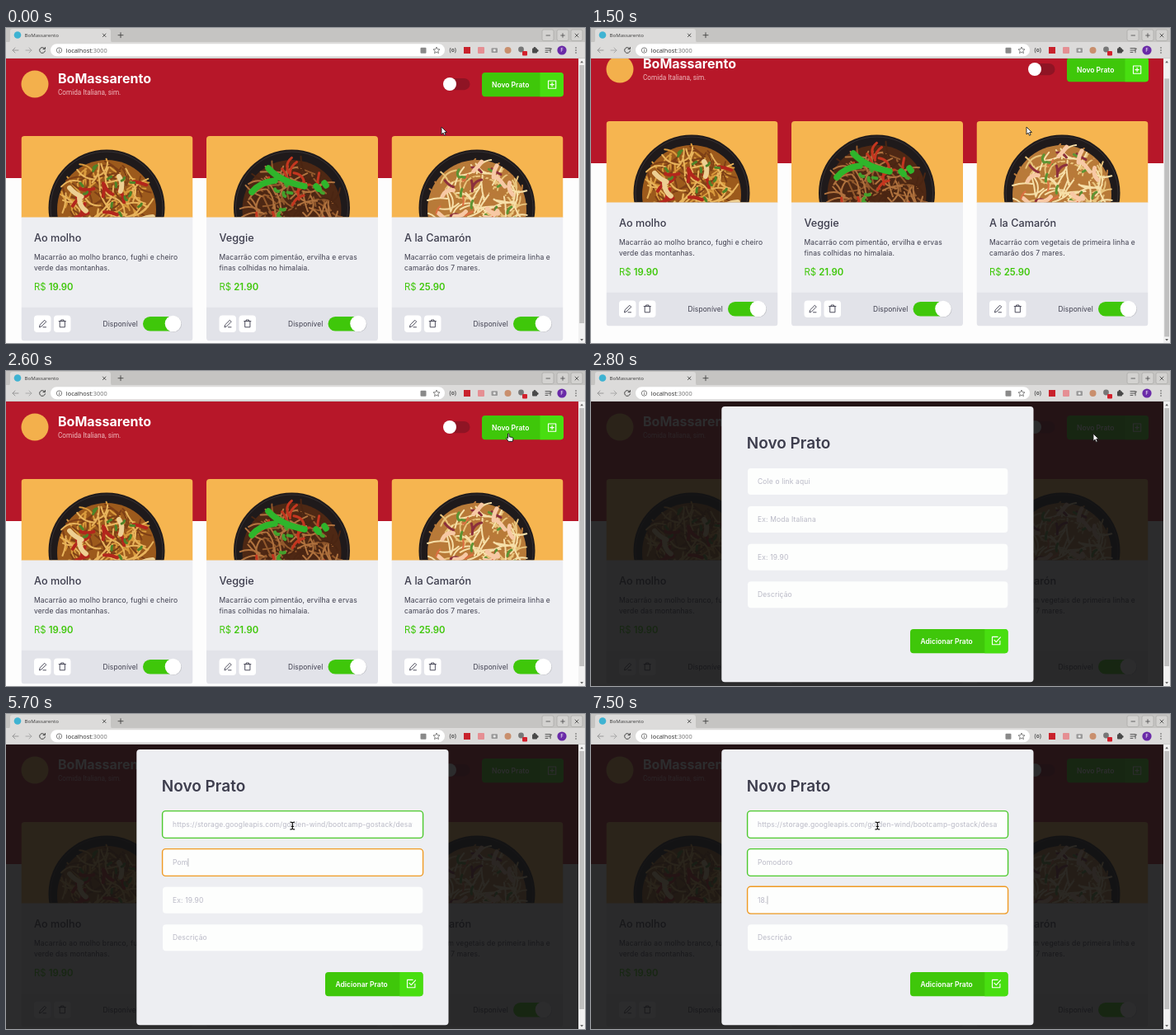
An HTML page for the animation above (8 s loop, 702 px wide and 382 px high).

```html
<!DOCTYPE html>
<html lang="pt-BR">
<head>
<meta charset="utf-8">
<title>BoMassarento</title>
<style>
  html, body { margin: 0; width: 100%; height: 100%; overflow: hidden; background: #fdfdfd; }
  svg { display: block; width: 702px; height: 382px; }
  text { font-family: Inter, "Open Sans", sans-serif; white-space: pre; }
  .ui { font-family: "Noto Sans", sans-serif; }
  .body { letter-spacing: .14px; }
  .line { fill: none; stroke-linecap: round; stroke-linejoin: round; }
</style>
</head>
<body>
<svg id="stage" viewBox="0 0 702 382" xmlns="http://www.w3.org/2000/svg"></svg>
<script>
const LOOP = 8000, MAX_SCROLL = 18, MODAL_AT = 2800;
const GREEN = '#3fc70a', LIME = '#48de10', INK = '#3d3d4d', HINT = '#b9b9c6', CHROME = '#dcdbda';
const stage = document.getElementById('stage');

const rect = (x, y, w, h, fill, r = 0, more = '') =>
  `<rect x="${x}" y="${y}" width="${w}" height="${h}" rx="${r}" fill="${fill}" ${more}/>`;
const disc = (x, y, r, fill, more = '') =>
  `<circle cx="${x}" cy="${y}" r="${r}" fill="${fill}" ${more}/>`;
const line = (d, color, w = 1, more = '') =>
  `<path class="line" d="${d}" stroke="${color}" stroke-width="${w}" ${more}/>`;
const text = (x, y, str, size, fill, weight = 400, more = '') =>
  `<text x="${x}" y="${y}" font-size="${size}" fill="${fill}" font-weight="${weight}" ${more}>${str}</text>`;

function seeded(seed) {
  return () => (seed = (seed * 16807) % 2147483647) / 2147483647;
}

// Dish picture: dark plate, tangled strands and some garnish
function photo(cx, look, seed) {
  const rnd = seeded(seed), cy = 218;
  const spot = reach => {
    const a = rnd() * Math.PI * 2, r = Math.sqrt(rnd()) * reach;
    return [cx + r * Math.cos(a), cy + r * Math.sin(a)];
  };
  const strands = (n, len, reach) => {
    let d = '';
    for (let i = 0; i < n; i++) {
      const [x, y] = spot(reach), a = rnd() * 6.3, bend = (rnd() - .5) * len * 1.6;
      const dx = Math.cos(a) * len / 2, dy = Math.sin(a) * len / 2;
      d += `M${(x - dx).toFixed(1)} ${(y - dy).toFixed(1)}q${(dx - dy / len * bend).toFixed(1)} ` +
        `${(dy + dx / len * bend).toFixed(1)} ${(2 * dx).toFixed(1)} ${(2 * dy).toFixed(1)}`;
    }
    return d;
  };
  return disc(cx, cy, 70.5, '#1f1a1b') + disc(cx, cy, 68, 'none', 'stroke="#353032" stroke-width="1"') +
    disc(cx, cy + 2, 60, look.base) +
    look.noodles.map(c => line(strands(46, 24, 54), c, 2)).join('') +
    look.garnish.map(([c, n, len, w]) => line(strands(n, len, 52), c, w)).join('');
}

const dishes = [
  { x: 18.5, name: 'Ao molho', price: '19.90',
    info: ['Macarrão ao molho branco, fughi e cheiro', 'verde das montanhas.'],
    look: { base: '#9c5a1c', noodles: ['#d99a3c', '#7d3f16', '#e8b45c'],
      garnish: [['#b3261c', 13, 16, 4], ['#edcf92', 11, 18, 6], ['#4f8428', 18, 5, 3]] } },
  { x: 243, name: 'Veggie', price: '21.90',
    info: ['Macarrão com pimentão, ervilha e ervas', 'finas colhidas no himalaia.'],
    look: { base: '#4e2814', noodles: ['#93592c', '#4a2512', '#b0723e'],
      garnish: [['#c4361f', 18, 18, 3], ['#43a02c', 9, 5, 4]] },
    extra: 'M318 170q14 16 44 22M298 199q10-12 28-14M376 192l3 3M386 188l2 3' },
  { x: 467.5, name: 'A la Camarón', price: '25.90',
    info: ['Macarrão com vegetais de primeira linha e', 'camarão dos 7 mares.'],
    look: { base: '#b87a38', noodles: ['#e9c47c', '#b9793a', '#f6dfa8'],
      garnish: [['#8c2f3c', 9, 13, 3], ['#5d9433', 12, 9, 3], ['#f7c8a4', 14, 15, 5], ['#dd6f42', 9, 10, 2]] } }
];

function card({ x, name, price, info, look, extra }, i) {
  const tx = x + 15.5;
  return `<g clip-path="url(#card${i})">` +
    rect(x, 131, 208, 99, '#f6b550') +
    `<g clip-path="url(#pic${i})">` + photo(x + 103.5, look, 71 + i * 913) +
    (extra ? line(extra, '#2fb52b', 7.5) : '') + '</g>' +
    rect(x, 229.5, 208, 109, '#edeef2') + rect(x, 338.5, 208, 41, '#e2e3e9') + '</g>' +
    text(tx, 258.5, name, 12.7, INK, 500) +
    info.map((s, k) => text(tx, 281 + k * 12.6, s, 8.5, INK, 400, 'class="body"')).join('') +
    text(tx, 318, `R$ <tspan font-weight="600">${price}</tspan>`, 11.3, GREEN) +
    rect(tx, 348.5, 20.5, 20.5, '#fff', 4) + rect(tx + 24, 348.5, 20.5, 20.5, '#fff', 4) +
    line(`M${tx + 6.5} 362.5l.7-2.6 5.6-5.6 1.9 1.9-5.6 5.6zM${tx + 11} 362.8h3.5`, INK, .9) +
    line(`M${tx + 30.2} 355.6h8.2M${tx + 32.6} 355.4v-1.4h3.4v1.4M${tx + 31.2} 355.8v7h6.2v-7`, INK, .9) +
    text(x + 99, 361.6, 'Disponível', 8.4, INK, 400, 'class="body"') +
    rect(x + 147.5, 350, 44.5, 17.5, GREEN, 8.75) +
    disc(x + 184.5, 359, 10, '#0002') + disc(x + 184, 358.5, 9.8, '#fff');
}

function button(x, y, w, split, label, lx, icon) {
  return rect(x, y, w, 29.2, GREEN, 4) +
    `<path d="M${split} ${y}H${x + w - 4}q4 0 4 4v21.2q0 4-4 4H${split}z" fill="${LIME}"/>` +
    text(lx, y + 17.5, label, 8.5, '#fff', 600) + line(icon, '#fff', 1.1);
}

const clips = dishes.map(({ x }, i) =>
  `<clipPath id="card${i}">${rect(x, 131, 208, 248.5, '#000', 4)}</clipPath>` +
  `<clipPath id="pic${i}">${rect(x, 131, 208, 98.5, '#000')}</clipPath>`).join('');

const page = rect(0, 0, 694, 182, '#b71729') +
  disc(35, 68, 16.5, '#f3b04c') +
  text(63, 67, 'BoMassarento', 16, '#fff', 700) +
  text(63, 81, 'Comida Italiana, sim.', 8.2, '#eeb9bd', 400, 'style="font-family:Roboto,sans-serif"') +
  rect(532, 61, 30.5, 14.2, '#8f1424', 7.1) + disc(538, 68, 8, '#fff') +
  button(577, 54, 99, 647.5, 'Novo Prato', 589,
    'M657.5 64h9.2v9.2h-9.2zM662.1 66.4v4.4M659.9 68.6h4.4') +
  dishes.map(card).join('');

const URL_TEXT = 'https://storage.googleapis.com/golden-wind/bootcamp-gostack/desafio-food/food1.png';
const fields = [
  { y: 117, hint: 'Cole o link aqui', value: URL_TEXT, keys: [4100], from: 3900, to: 4600 },
  { y: 163, hint: 'Ex: Moda Italiana', value: 'Pomodoro',
    keys: [5200, 5400, 5700, 5800, 5900, 6100, 6200, 6300], from: 4600, to: 6500 },
  { y: 208.7, hint: 'Ex: 19.90', value: '18.', keys: [7100, 7200, 7500], from: 6500, to: LOOP },
  { y: 254.3, hint: 'Descrição', value: '', keys: [], from: LOOP, to: LOOP }
];

const modal = rect(0, 37, 694, 345, '#121214', 0, 'opacity=".89"') +
  rect(158.3, 43, 378.2, 334.3, '#edeef2', 4) +
  text(188.8, 93.8, 'Novo Prato', 19, INK, 600) +
  fields.map((f, i) => rect(190, f.y + 1, 315.3, 32, '#fdfefd', 4) +
    rect(189.6, f.y + .6, 316, 32.8, 'none', 4, `id="edge${i}" stroke-width="1.4"`) +
    `<g clip-path="url(#inner)">` + text(202, f.y + 20, '', 8.5, HINT, 400, `id="val${i}" class="body"`) + '</g>' +
    rect(0, f.y + 12, .7, 10, '#9a9aa4', 0, `id="caret${i}"`)).join('') +
  `<g clip-path="url(#inner)"><path id="spell" class="line" stroke="#f08a94" stroke-width=".9"/></g>` +
  button(387, 313, 118.6, 477.3, 'Adicionar Prato', 399.5,
    'M495.9 327.2v4.6h-9.4v-9.4h6.6M489 326.4l2.3 2.3 5.2-5.8');

const windowButton = (x, d) => rect(x, 2, 14, 13.5, '#d3d2d0', 2, 'stroke="#aaa9a7" stroke-width=".7"') +
  line(d, '#555', .9);

const browser = rect(0, 0, 702, 18, '#c5c4c2') +
  `<path d="M2 18q3 0 3-4V4q0-3 3-3h116q3 0 3 3v10q0 4 3 4z" fill="${CHROME}"/>` +
  rect(0, 17, 702, 20, CHROME) + rect(0, 36.3, 702, .7, '#c6c6c5') +
  disc(14, 8.5, 4.3, '#3fb3d2') +
  text(22.5, 11, 'BoMassarento', 6.1, '#444', 400, 'class="ui"') +
  line('M117.4 7l3.6 3.6M121 7l-3.6 3.6M136 8.7h6M139 5.7v6', '#444', .9) +
  windowButton(650, 'M655 9h4.5') + windowButton(668, 'M672.7 9h4.6M675 6.7v4.6') +
  windowButton(685, 'M690 7l4 4M694 7l-4 4') +
  line('M15 27H8M11 24l-3 3 3 3', '#999', 1) + line('M24 27h7M28 24l3 3-3 3', '#aaa', 1) +
  line('M47 25.2a3.4 3.4 0 1 0 .4 2.6M47.4 23.4v2.2h-2.3', '#444', 1) +
  rect(54, 19.3, 478, 15, '#fff', 7.5) +
  disc(64.5, 27, 3.2, 'none', 'stroke="#666" stroke-width=".8"') + line('M64.5 26.8v1.8M64.5 25.2v.1', '#666', .8) +
  text(72.8, 29.6, 'localhost<tspan fill="#777">:3000</tspan>', 7.35, '#333', 400, 'class="ui"') +
  rect(502.5, 23.7, 7, 7, '#8a8a8a', 1) +
  '<path d="M522 23l1.1 2.7 2.9.2-2.2 1.9.7 2.8-2.5-1.5-2.5 1.5.7-2.8-2.2-1.9 2.9-.2z" fill="none" stroke="#666" stroke-width=".8"/>' +
  text(537.5, 29.4, '(o)', 6.5, '#555', 700, 'class="ui"') +
  rect(555, 23, 8, 8, '#c9222c') + rect(572, 23, 8, 8, '#e58f93', 1) +
  rect(588.5, 24.3, 7.5, 5.7, '#999', 1) + disc(592.2, 27, 1.6, '#e6e6e6') +
  disc(608.5, 27, 4, '#c98f6d') + disc(624.5, 26, 3.4, '#777') + rect(626, 28, 6, 5.5, '#d3202c', 1) +
  rect(638, 24.5, 6, 6, '#4a4a4a', 1) + disc(641, 24.3, 1.4, '#4a4a4a') + disc(644.2, 27.5, 1.4, '#4a4a4a') +
  line('M654 24.6h6M654 27h6M654 29.4h3M660 29.8v-4.6h1.5', '#555', 1) +
  disc(674, 27, 5.6, '#6a2aa8') + text(672.2, 29.3, 'F', 6.3, '#fff', 400, 'class="ui"') +
  [24, 27, 30].map(y => disc(691, y, .8, '#555')).join('');

const scrollbar = rect(694, 37, 8, 345, '#f1f1f1') +
  '<path d="M696.2 42.2h3.8l-1.9-2.4zM696.2 377h3.8l-1.9 2.4z" fill="#666"/>' +
  rect(695.2, 45, 5.8, 313, '#c0c0c0', 0, 'id="thumb"');

const beam = 'M-2.4-4.4Q0-4.4 0-3.2V3.2Q0 4.4-2.4 4.4M2.4-4.4Q0-4.4 0-3.2M0 3.2Q0 4.4 2.4 4.4M-1.2.8h2.4';
const pointers = `
  <g id="arrow"><path d="M0 0v9l2.1-1.9 1.4 3.2 1.6-.7L3.7 6.5h2.8z" fill="#fff" stroke="#222" stroke-width=".9"/></g>
  <g id="hand"><path d="M-.5 0q1.2-.6 1.6.6v3.2l4 .7q1 .3.8 1.5l-.6 3.4H.2L-2.2 6q-.6-1.2.7-1.2l1 .9z" fill="#fff" stroke="#111" stroke-width=".9"/></g>
  <g id="beam">${line(beam, '#fff', 2.2)}${line(beam, '#111', 1.2)}</g>`;

stage.innerHTML = `<defs>${clips}
    <clipPath id="view">${rect(0, 37, 694, 345, '#000')}</clipPath>
    <clipPath id="inner">${rect(202, 110, 290.5, 180, '#000')}</clipPath></defs>` +
  rect(0, 0, 702, 382, '#fdfdfd') +
  `<g clip-path="url(#view)"><g id="page">${page}</g></g><g id="modal">${modal}</g>` +
  scrollbar + browser + pointers;

const $ = id => document.getElementById(id);
const show = (el, on) => el.setAttribute('visibility', on ? 'visible' : 'hidden');
const move = (el, x, y) => el.setAttribute('transform', `translate(${x} ${y})`);

// Piecewise motion through [time, value...] stops, eased between each pair
function follow(stops, t) {
  const i = stops.findIndex(s => s[0] > t);
  if (i < 0) return stops[stops.length - 1].slice(1);
  if (i === 0) return stops[0].slice(1);
  const a = stops[i - 1], b = stops[i];
  const p = (t - a[0]) / (b[0] - a[0]), e = p * p * (3 - 2 * p);
  return a.slice(1).map((v, k) => v + (b[k + 1] - v) * e);
}

const scrollStops = [[0, 0], [400, MAX_SCROLL], [900, 0], [1100, 0], [1500, MAX_SCROLL], [2000, 0]];
const mouseStops = [[2000, 528, 120], [2600, 609, 76], [3000, 609, 76], [3500, 347.3, 135.5]];

function drawField(f, i, t) {
  const n = f.keys.filter(k => t >= k).length;
  const typed = n ? f.value.slice(0, f.value.length * n / f.keys.length) : '';
  const focused = t >= f.from && t < f.to;
  const val = $('val' + i), caret = $('caret' + i), edge = $('edge' + i);
  const str = typed || f.hint;
  if (val.textContent !== str) val.textContent = str;
  const width = typed ? val.getComputedTextLength() : 0;
  const left = focused ? Math.min(202, 491.5 - width) : 202;
  val.setAttribute('x', left);
  caret.setAttribute('x', left + width + .2);
  show(caret, focused);
  edge.setAttribute('stroke', focused ? '#f09a22' : typed ? '#4cc92c' : 'none');
}

function drawSpelling(t) {
  const on = t >= 4300 && t < 4600;
  show($('spell'), on);
  if (!on) return;
  const val = $('val0');
  const d = ['googleapis.com', 'golden-wind', 'bootcamp-gostack', 'food1.png'].map(word => {
    const at = URL_TEXT.indexOf(word);
    const x0 = val.getStartPositionOfChar(at).x, x1 = val.getEndPositionOfChar(at + word.length - 1).x;
    return `M${x0} 138.8H${x1}`;
  });
  $('spell').setAttribute('d', d.join(''));
}

function draw(time) {
  const t = Math.floor(time / 100) * 100;
  const scroll = Math.round(follow(scrollStops, t)[0]);
  move($('page'), 0, -scroll);
  move($('thumb'), 0, scroll * .91);

  const open = t >= MODAL_AT;
  show($('modal'), open);
  fields.forEach((f, i) => drawField(f, i, t));
  drawSpelling(t);

  const [x, y] = follow(mouseStops, t);
  const kind = open ? (x < 505 && y > 117 ? 'beam' : 'arrow') : (x > 577 && y < 83 ? 'hand' : 'arrow');
  for (const id of ['arrow', 'hand', 'beam']) {
    show($(id), id === kind);
    move($(id), x, y);
  }
}

const start = performance.now();
(function tick() {
  draw((performance.now() - start) % LOOP);
  requestAnimationFrame(tick);
})();
</script>
</body>
</html>
```
